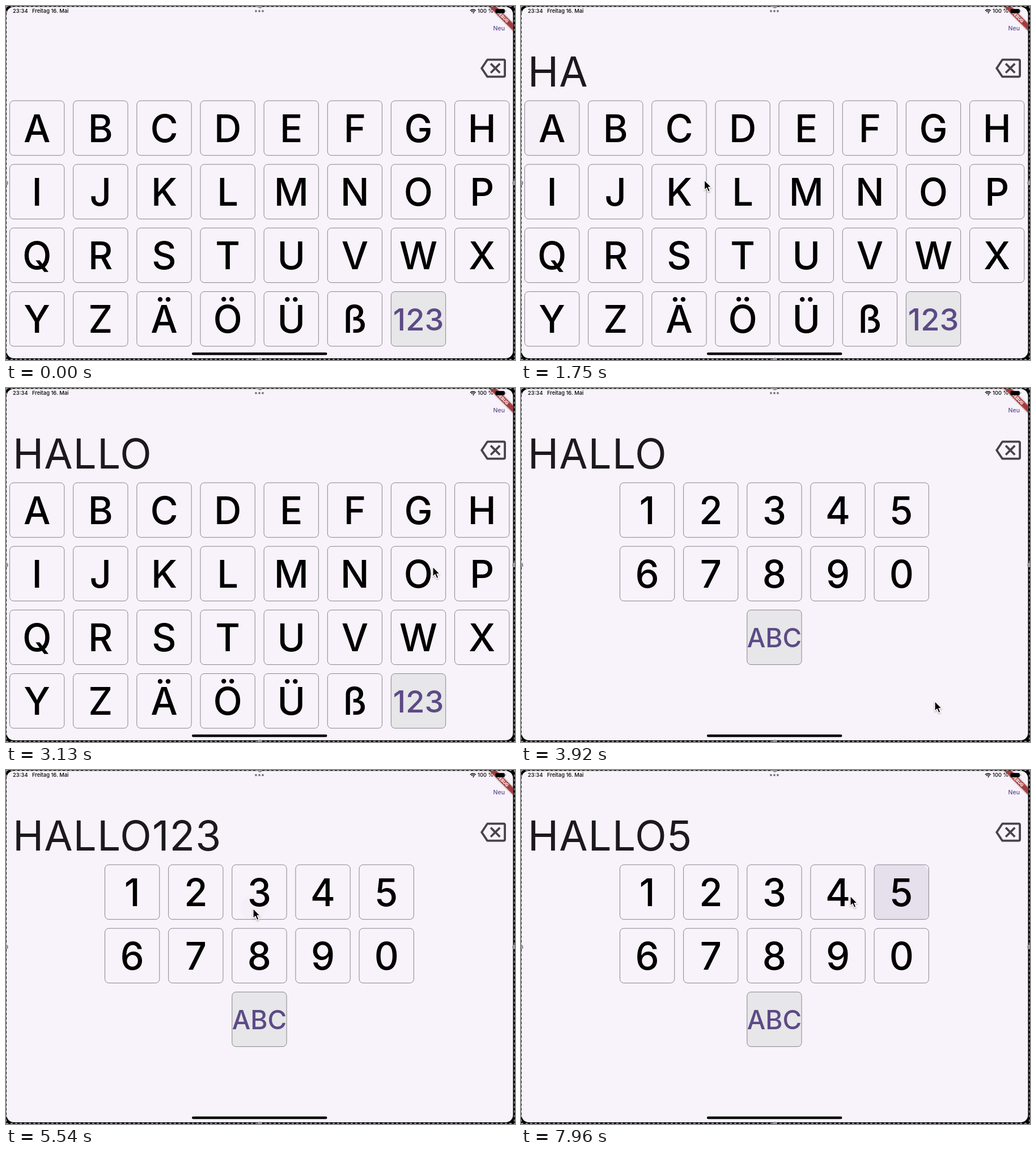
Recreate the animation shown at these times as an HTML page. Size 898 by 624 pixels, loop 8000 ms.

```html
<!DOCTYPE html>
<html lang="de">
<head>
<meta charset="utf-8">
<title>Buchstabentafel</title>
<style>
  html, body { margin: 0; width: 100%; height: 100%; overflow: hidden; background: #000; }
  svg { display: block; width: 100%; height: 100%; }
  text { font-family: Inter, Roboto, sans-serif; font-optical-sizing: none; font-weight: 500; white-space: pre; }
  .key rect { fill: none; stroke: #88838d; }
  .key text { font-size: 67px; text-anchor: middle; }
  .key.mode rect { fill: #e7e6e8; }
  .key.mode text { fill: #5c4a86; }
  .status { font-size: 9.4px; }
  #out { font-size: 73px; font-weight: 400; letter-spacing: 1px; fill: #1b191e; }
  #ripples { fill: #65558f; }
</style>
</head>
<body>
<svg viewBox="0 0 898 624" id="stage">
  <defs>
    <clipPath id="screen"><rect x="1" y="1.5" width="893.5" height="619.5" rx="13"/></clipPath>
    <filter id="soft" x="-50%" y="-100%" width="200%" height="300%"><feGaussianBlur stdDeviation="1.8"/></filter>
    <filter id="drop" x="-50%" y="-50%" width="200%" height="200%">
      <feDropShadow dx="0" dy="1.2" stdDeviation="1.1" flood-opacity=".4"/>
    </filter>
  </defs>

  <rect width="898" height="624"/>
  <g stroke="#999b96" stroke-dasharray="4 4" fill="none">
    <path d="M0 .7H898M0 622.9H898" stroke-width="1.6"/>
    <path d="M.5 0V624M896.7 0V624" stroke-width="1.4"/>
  </g>
  <rect x="1" y="1.5" width="893.5" height="619.5" rx="13" fill="#f8f3fa"/>
  <g fill="#97959a">
    <circle cx="448" cy="0" r="4"/><circle cx="448" cy="624" r="4"/>
    <circle cx="0" cy="312" r="4"/><circle cx="897" cy="312" r="4"/>
  </g>

  <g id="ripples"></g>
  <g id="letters"></g>
  <g id="digits"></g>
  <text id="out" x="12" y="142"></text>

  <text x="859.5" y="43" font-size="10.5" fill="#5f4d8c" letter-spacing=".1">Neu</text>
  <path transform="translate(837 87.2) scale(1.875)" fill="#47434d" d="M22 3H7c-.69 0-1.23.35-1.59.88L0 12l5.41 8.11c.36.53.9.89 1.59.89h15c1.1 0 2-.9 2-2V5c0-1.1-.9-2-2-2zm0 16H7.07L2.4 12l4.66-7H22v14zm-11.59-2L14 13.41 17.59 17 19 15.59 15.41 12 19 8.41 17.59 7 14 10.59 10.41 7 9 8.41 12.59 12 9 15.59z"/>

  <g clip-path="url(#screen)">
    <g transform="translate(894.5 1) rotate(45)">
      <rect x="-34" y="21" width="68" height="9" opacity=".5" filter="url(#soft)"/>
      <rect x="-34" y="21" width="68" height="9" fill="#b71c1c" opacity=".66"/>
      <text y="28.2" text-anchor="middle" font-size="7.4" fill="#fff" style="font-weight:800">DEBUG</text>
    </g>
  </g>

  <g class="status">
    <text x="12" y="12.3">23:34</text>
    <text x="46" y="12.3">Freitag 16. Mai</text>
    <text x="832" y="12.3">100 %</text>
  </g>
  <g fill="#77747a">
    <circle cx="441" cy="9" r="1.9"/><circle cx="447" cy="9" r="1.9"/><circle cx="453" cy="9" r="1.9"/>
  </g>
  <g fill="none" stroke="#000" stroke-width="1.5">
    <path d="M819 8.2a7.2 7.2 0 0 1 9.8 0M820.9 10.2a4.4 4.4 0 0 1 6 0"/>
    <path d="M823.9 11.2l1.3 1.3" stroke-width="2"/>
  </g>
  <rect x="863.5" y="5.3" width="16.5" height="7.4" rx="2.2"/>
  <rect x="880.8" y="7.6" width="1.2" height="2.8" rx=".6" opacity=".5"/>
  <rect x="328" y="610.8" width="238.5" height="4.4" rx="2.2"/>

  <g id="cursor" filter="url(#drop)">
    <path d="M0 0V17.6L4 13.8 6.9 20.6 10 19.3 7.2 12.7H12.6Z" stroke="#fff" stroke-width="1.3" stroke-linejoin="round"/>
  </g>
</svg>

<script>
const LOOP = 8000, PITCH = 112.15, SIZE = 96.3, TOP = 167;
const $ = id => document.getElementById(id);

function add(parent, tag, attrs, content) {
  const el = document.createElementNS('http://www.w3.org/2000/svg', tag);
  for (const name in attrs) el.setAttribute(name, attrs[name]);
  if (content) el.textContent = content;
  parent.append(el);
  return el;
}

const keys = {};
function addKey(group, label, x, y, fontSize) {
  const g = add(group, 'g', { class: fontSize ? 'key mode' : 'key' });
  add(g, 'rect', { x, y, width: SIZE, height: SIZE, rx: 7 });
  const text = add(g, 'text', { x: x + SIZE / 2, y: y + (fontSize ? 48.5 + fontSize * .364 : 73) }, label);
  if (fontSize) text.style.fontSize = fontSize + 'px';
  keys[label] = { x, y };
}
function addGrid(group, labels, columns, left) {
  [...labels].forEach((label, i) =>
    addKey(group, label, left + i % columns * PITCH, TOP + Math.floor(i / columns) * PITCH));
}
addGrid($('letters'), 'ABCDEFGHIJKLMNOPQRSTUVWXYZÄÖÜß', 8, 6.5);
addKey($('letters'), '123', 6.5 + 6 * PITCH, TOP + 3 * PITCH, 54);
addGrid($('digits'), '1234567890', 5, 174.5);
addKey($('digits'), 'ABC', 174.5 + 2 * PITCH, TOP + 2 * PITCH, 46);

// time, x, y of the pointer tip
const path = [
  [150, 900, 330], [560, 842, 218], [700, 842, 218], [1170, 99, 268],
  [1340, 58, 222], [1440, 58, 222], [1880, 393, 329], [2360, 393, 329],
  [2640, 735, 325], [2760, 735, 325], [3130, 753, 315], [3350, 753, 315],
  [3800, 730, 552], [3980, 730, 552], [4700, 256, 224], [4920, 261, 213],
  [4970, 258, 215], [5110, 332, 225], [5190, 332, 225], [5500, 436, 244],
  [5580, 436, 244], [6150, 862, 112], [7040, 862, 112], [7750, 660, 224],
  [7840, 660, 224], [7960, 581, 222], [8000, 561, 220]
];
const taps = [
  [650, 'H'], [1400, 'A'], [1970, 'L'], [2289, 'L'], [2700, 'O'], [3900, '123'],
  [4950, '1'], [5160, '2'], [5534, '3'],
  [6350, 'back'], [6650, 'back'], [6950, 'back'], [7828, '5']
];

const clamp = v => Math.min(1, Math.max(0, v));
const smooth = p => p * p * (3 - 2 * p);
const mix = (a, b, p) => a + (b - a) * p;

function pointer(t) {
  const i = path.findIndex(p => p[0] > t);
  if (i < 1) return i ? path[path.length - 1].slice(1) : path[0].slice(1);
  const a = path[i - 1], b = path[i];
  const p = smooth((t - a[0]) / (b[0] - a[0]));
  return [mix(a[1], b[1], p), mix(a[2], b[2], p)];
}

const ripples = taps.filter(tap => tap[1].length === 1).map(([start, label], i) => {
  const { x, y } = keys[label], [fromX, fromY] = pointer(start);
  const clip = add($('ripples'), 'clipPath', { id: 'clip' + i });
  add(clip, 'rect', { x, y, width: SIZE, height: SIZE, rx: 7 });
  const circle = add($('ripples'), 'circle', { 'clip-path': `url(#clip${i})` });
  return { start, fromX, fromY, toX: x + SIZE / 2, toY: y + SIZE / 2, circle };
});

function drawRipple(r, t) {
  const age = t - r.start;
  const p = 1 - (1 - clamp(age / 225)) ** 2;
  const alpha = clamp(age / 40) * (1 - clamp((age - 225) / 150));
  r.circle.setAttribute('cx', mix(r.fromX, r.toX, p));
  r.circle.setAttribute('cy', mix(r.fromY, r.toY, p));
  r.circle.setAttribute('r', mix(20, 73, p));
  r.circle.setAttribute('opacity', .12 * alpha);
}

function draw(t) {
  let word = '', numeric = false;
  for (const [at, label] of taps) {
    if (at > t) break;
    if (label === '123') numeric = true;
    else word = label === 'back' ? word.slice(0, -1) : word + label;
  }
  $('out').textContent = word;
  $('letters').style.display = numeric ? 'none' : '';
  $('digits').style.display = numeric ? '' : 'none';
  ripples.forEach(r => drawRipple(r, t));
  const [x, y] = pointer(t);
  $('cursor').style.display = t < path[0][0] ? 'none' : '';
  $('cursor').setAttribute('transform', `translate(${x} ${y})`);
}

const begin = performance.now();
function tick() {
  draw((performance.now() - begin) % LOOP);
  requestAnimationFrame(tick);
}
tick();
</script>
</body>
</html>
```
